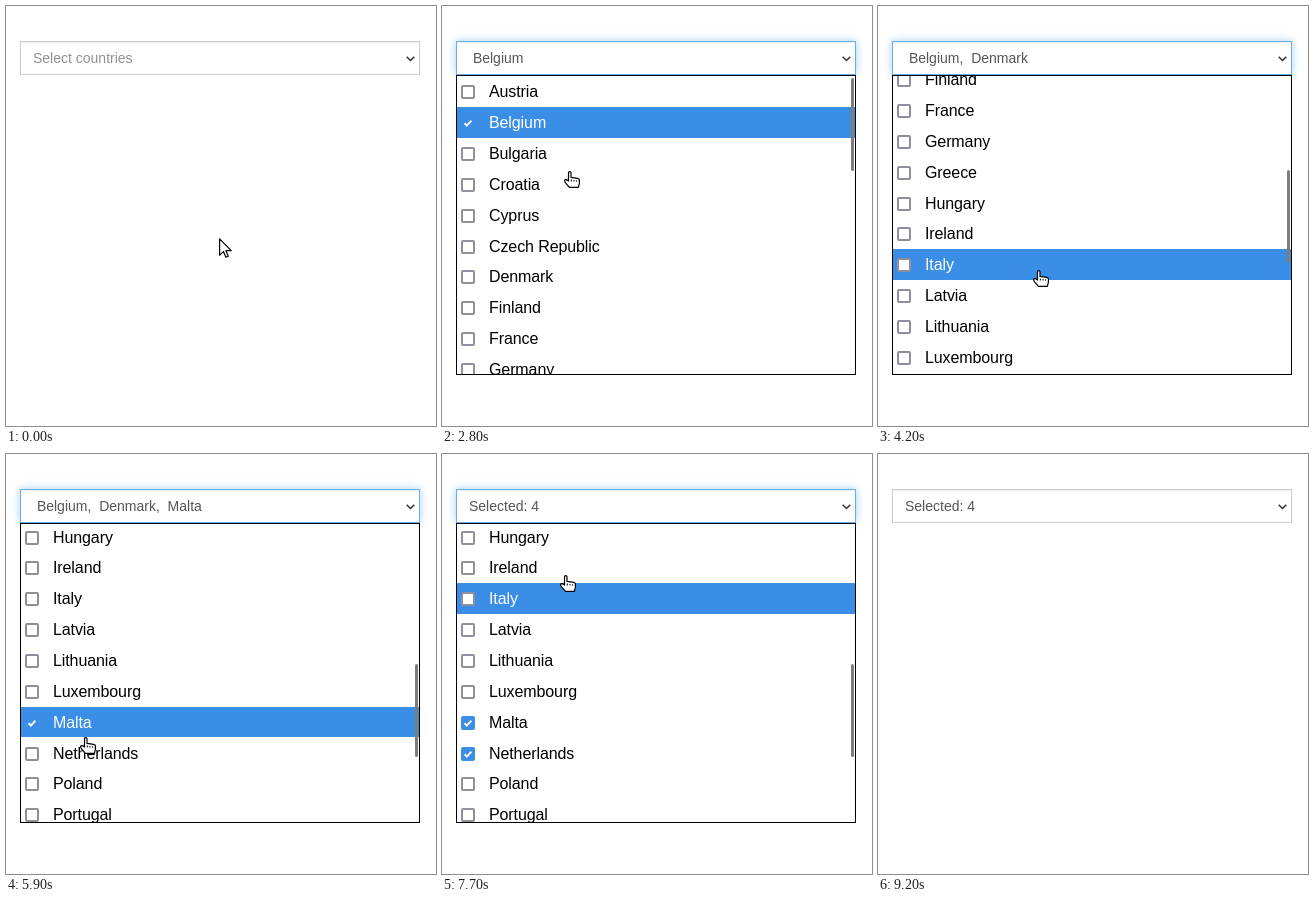
An HTML page that plays this animation: 430 px wide and 420 px high, repeating every 9.5 s.

```html
<!DOCTYPE html>
<html lang="en">
<head>
<meta charset="utf-8">
<title>Country multi-select</title>
<style>
  html, body { margin: 0; width: 100%; height: 100%; overflow: hidden; background: #fff; }
  body { position: relative; font-family: "Liberation Sans", Arial, sans-serif; }
  #field {
    position: absolute; left: 14px; top: 35px; width: 400px; height: 34px;
    box-sizing: border-box; border: 1px solid #ccc; background: #fff;
    padding-left: 12px; font-size: 14px; line-height: 32px; white-space: pre;
  }
  #menu {
    position: absolute; left: 14px; top: 69px; width: 398px; height: 298px;
    border: 1px solid #000; background: #fff; overflow: hidden;
  }
  .row { position: absolute; left: 0; width: 398px; color: #000; }
  .row.hot { background: #3a8ee6; color: #fff; }
  .row span {
    position: absolute; left: 32px; font-size: 16px; line-height: 31px;
    letter-spacing: -.1px; white-space: nowrap;
  }
  .box {
    position: absolute; left: 4px; width: 14px; height: 14px; box-sizing: border-box;
    border: 2px solid #8f8f9d; border-radius: 2px; background: #fff;
  }
  .on .box { border-color: #3a8ee6; background: #3a8ee6; }
  .box svg { position: absolute; left: -2px; top: -2px; display: none; }
  .on .box svg { display: block; }
  #thumb {
    position: absolute; left: 394px; width: 3px; height: 93px;
    border-radius: 1.5px; background: #7d7d7d;
  }
  svg { fill: none; overflow: visible; }
  #chevron, .cursor { position: absolute; left: 0; top: 0; }
  .cursor { fill: #fff; stroke: #000; stroke-width: 1.2; stroke-linejoin: round; }
</style>
</head>
<body>
<div id="field"></div>
<svg id="chevron" width="430" height="70"><path d="M400.7 50.7l3.8 3.8 3.8-3.8" stroke="#333" stroke-width="1.5"/></svg>
<div id="menu"><div id="rows"></div><div id="thumb"></div></div>
<svg id="arrow" class="cursor" width="13" height="20"><path d="M.6.8v16.4l3.8-3.6 2.5 5.6 2.4-1-2.4-5.5h5.3z"/></svg>
<svg id="hand" class="cursor" width="16" height="17">
  <path d="M4.5 10V1.8a1.2 1.2 0 0 1 2.5 0v4.6l6.6.9q1.8.3 1.8 1.8v3.1l-1 4.2h-9l-3-3.6q-2.6-2.8-1.6-3.8t3.7 1z"/>
  <path d="M7.3 8.5v2M10 9v1.5M12.6 9.3v1.4" stroke-width="1"/>
</svg>
<script>
const LOOP = 9500, STEP = 100, PITCH = 30.85;
const names = ("Austria,Belgium,Bulgaria,Croatia,Cyprus,Czech Republic,Denmark,Finland,France," +
  "Germany,Greece,Hungary,Ireland,Italy,Latvia,Lithuania,Luxembourg,Malta,Netherlands," +
  "Poland,Portugal,Romania,Slovakia,Slovenia").split(",");

// first step, last step, target x, target y, easing power
const moves = [
  [0, 0, 213, 232],
  [200, 300, 194, 76],
  [500, 600, 188, 63],
  [1100, 1400, 172, 60],
  [1700, 2200, 147, 115],
  [2800, 3200, 85, 272],
  [3600, 3700, 160, 264],
  [4700, 5100, 76, 272.5],
  [5900, 6100, 85, 304, 1],
  [6400, 6400, 85, 303],
  [7000, 7100, 88, 294],
  [7400, 7700, 123, 121],
  [7800, 8300, 97, 373],
  [8400, 8400, 97, 377],
  [8500, 9200, 190, -25, 1]
];
const scrolls = [[0, 0, 0, 0], [3900, 4200, 228, 0], [4400, 4600, 342, 0]];
const checks = { Belgium: 2600, Denmark: 3500, Malta: 5200, Netherlands: 6400 };
const OPEN = 900, CLOSE = 8400;

const $ = id => document.getElementById(id);
const field = $("field"), menu = $("menu"), thumb = $("thumb"), arrow = $("arrow"), hand = $("hand");

const rows = names.map(name => {
  const el = document.createElement("div");
  el.className = "row";
  el.innerHTML = '<div class="box"><svg width="14" height="14"><path d="M3.6 7.2l2.3 2.4 4.5-5" ' +
    'stroke="#fff" stroke-width="2"/></svg></div><span>' + name + "</span>";
  $("rows").append(el);
  return { el, name, box: el.firstChild, label: el.lastChild };
});

// Position along a list of eased moves
function track(list, t) {
  let x = list[0][2], y = list[0][3];
  for (const [from, to, tx, ty, power = 1.7] of list) {
    if (t < from) break;
    const p = Math.min(1, (t - from + STEP) / (to - from + STEP));
    const k = 1 - Math.pow(1 - p, power);
    x += (tx - x) * k;
    y += (ty - y) * k;
  }
  return [x, y];
}

function place(el, x, y, show) {
  el.style.display = show ? "block" : "none";
  el.style.transform = `translate(${Math.round(x)}px, ${Math.round(y)}px)`;
}

function drawField(t) {
  const chosen = Object.keys(checks).filter(name => t >= checks[name]);
  field.textContent = !chosen.length ? "Select countries"
    : chosen.length > 3 ? "Selected: " + chosen.length
    : " " + chosen.join(",  ");
  field.style.color = chosen.length ? "#555" : "#909090";
  const ramp = from => Math.max(0, Math.min(1, (t - from + STEP) / (2 * STEP)));
  const glow = t < CLOSE ? ramp(OPEN) * (t >= OPEN) : (1 - ramp(CLOSE));
  const mix = c => Math.round(204 + (c - 204) * glow);
  field.style.borderColor = `rgb(${mix(102)}, ${mix(175)}, ${mix(233)})`;
  field.style.boxShadow = "inset 0 1px 1px rgba(0,0,0,.075), " +
    `0 0 8px rgba(102,175,233,${.6 * glow})`;
}

function drawMenu(t, scroll, hoverY) {
  const top = i => Math.round(70.15 + PITCH * i - scroll);
  rows.forEach(({ el, name, box, label }, i) => {
    const y0 = top(i), y1 = top(i + 1), mid = Math.floor(85.77 + PITCH * i - scroll);
    el.style.top = y0 - 70 + "px";
    el.style.height = y1 - y0 + "px";
    box.style.top = mid - 6 - y0 + "px";
    label.style.top = mid - 15 - y0 + "px";
    el.classList.toggle("hot", hoverY >= 70 && hoverY >= y0 && hoverY < y1);
    el.classList.toggle("on", t >= checks[name]);
  });
  thumb.style.top = Math.round(2 + scroll * .4035) + "px";
}

function draw(t) {
  const [x, y] = track(moves, t);
  const open = t >= OPEN && t < CLOSE;
  const over = open && y >= 70 && y < 369;
  drawField(t);
  menu.style.display = open ? "block" : "none";
  // The highlight trails the pointer by one step
  if (open) drawMenu(t, track(scrolls, t)[0], over ? track(moves, t - STEP)[1] : -1);
  place(arrow, x, y, !over && y > -20);
  place(hand, x - 5, y, over);
}

const start = performance.now();
function tick() {
  const t = (performance.now() - start) % LOOP;
  draw(Math.floor(t / STEP) * STEP);
  requestAnimationFrame(tick);
}
tick();
</script>
</body>
</html>
```
